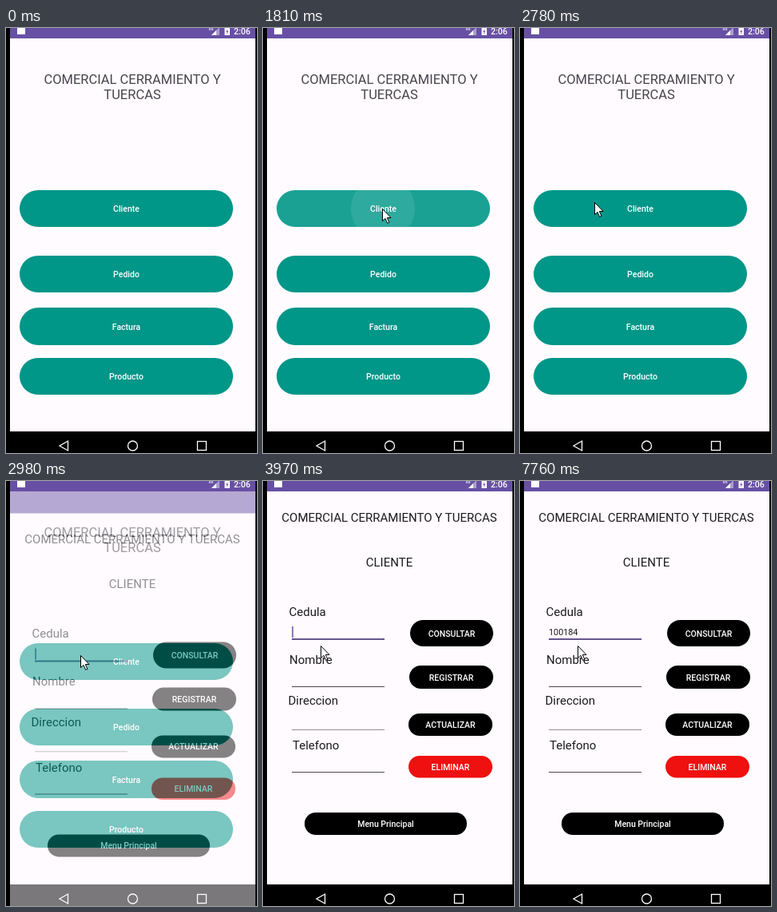
An HTML page for the animation above (8000 ms loop, 314 by 532 pixels).

```html
<!DOCTYPE html>
<html lang="es">
<head>
<meta charset="utf-8">
<style>
html, body { margin: 0; height: 100%; overflow: hidden; background: #000; }
svg { display: block; width: 314px; height: 532px; font-family: Roboto, sans-serif; }
.btn { font-size: 10.5px; font-weight: 500; fill: #fff; text-anchor: middle; }
.head { text-anchor: middle; }
</style>
</head>
<body>
<svg viewBox="0 0 314 532">
  <defs>
    <clipPath id="pill"><rect x="17" y="203" width="267" height="46" rx="23"/></clipPath>
    <clipPath id="screen"><rect x="5" width="307" height="532"/></clipPath>
  </defs>
  <g clip-path="url(#screen)">
    <g id="home">
      <rect x="5" width="307" height="505" fill="#fffbfe"/>
      <rect x="5" width="307" height="13" fill="#6750a4"/>
      <g class="head" font-size="16.5" fill="#49454f">
        <text x="158" y="70">COMERCIAL CERRAMIENTO Y</text>
        <text x="158" y="89.3">TUERCAS</text>
      </g>
    </g>
    <g id="form">
      <rect x="5" y="-60" width="307" height="565" fill="#fffbfe"/>
      <rect x="5" y="-60" width="307" height="73" fill="#6750a4"/>
      <rect x="5" y="505" width="307" height="60"/>
      <g font-size="15" fill="#1c1b1f">
        <g class="head">
          <text x="158" y="50.5">COMERCIAL CERRAMIENTO Y TUERCAS</text>
          <text x="158" y="106.5">CLIENTE</text>
        </g>
        <text x="32.5" y="169">Cedula</text>
        <text x="33" y="229">Nombre</text>
        <text x="31.5" y="279.7">Direccion</text>
        <text x="37" y="336.3">Telefono</text>
      </g>
      <path d="M36 198H152" stroke="#65558f" stroke-width="2"/>
      <path d="M36 257.5H152M36 364.5H152" stroke="#4d4951"/>
      <path d="M36 311.3H152" stroke="#8a868d"/>
      <text id="typed" x="36" y="193" font-size="10.8" fill="#1c1b1f"></text>
      <rect id="caret" y="182" width="1.5" height="14" fill="#6750a4"/>
    </g>
  </g>
  <g fill="none" stroke="#fff" stroke-width="1.3">
    <path d="M77.5 517V529L67 523Z"/>
    <circle cx="158.5" cy="523" r="6"/>
    <rect x="239.5" y="517.5" width="11" height="11"/>
  </g>
  <g fill="#fff">
    <rect x="14" y="-2" width="10" height="10"/>
    <path d="M257 9L267 -1V9Z" opacity=".45"/>
    <path d="M257 9L263 3V9Z"/>
    <path d="M254.5 0V3M256.5 0V3M258.5 0V3" stroke="#fff" stroke-width=".8"/>
    <rect x="273.5" y="-1" width="6.5" height="10"/>
    <path d="M277.4 1L275.3 5H276.6L276 8 278.3 4H277Z" fill="#6750a4"/>
    <text x="285" y="8" font-size="10.6" font-weight="500">2:06</text>
  </g>
  <path id="pointer" d="M.5 .5V15.6L4 12.4 6.6 18.4 8.9 17.4 6.3 11.5H11Z" fill="#fff" stroke="#000"/>
</svg>
<script>
const $ = id => document.getElementById(id);

function add(parent, tag, attrs, text = '') {
  const el = document.createElementNS('http://www.w3.org/2000/svg', tag);
  for (const k in attrs) el.setAttribute(k, attrs[k]);
  el.textContent = text;
  return parent.appendChild(el);
}

function button(parent, label, x, y, w, h, fill) {
  add(parent, 'rect', { x, y, width: w, height: h, rx: h / 2, fill });
  const overlay = add(parent, 'g', {});
  add(parent, 'text', { x: x + w / 2, y: y + h / 2 + 4, class: 'btn' }, label);
  return overlay;
}

const teal = '#009688';
const press = button($('home'), 'Cliente', 17, 203, 267, 46, teal);
button($('home'), 'Pedido', 17, 285, 267, 46, teal);
button($('home'), 'Factura', 17, 350, 267, 47, teal);
button($('home'), 'Producto', 17, 413, 267, 46, teal);

button($('form'), 'CONSULTAR', 184, 174, 104, 33, '#000');
button($('form'), 'REGISTRAR', 183, 231, 105, 29, '#000');
button($('form'), 'ACTUALIZAR', 182, 291, 105, 28, '#000');
button($('form'), 'ELIMINAR', 182, 344, 105, 27.5, '#ef1010');
button($('form'), 'Menu Principal', 52, 415, 203, 28, '#000');

press.setAttribute('clip-path', 'url(#pill)');
const glow = add(press, 'rect', { x: 17, y: 203, width: 267, height: 46, fill: '#fff' });
const ripple = add(press, 'circle', { cx: 150, cy: 226, fill: '#fff', opacity: .09 });

// Progress 0..1 from a to b, held on n evenly spaced moments
const stepped = (t, a, b, n) =>
  Math.min(1, Math.floor((t - a) / (b - a) * (n - 1) + 1e-6) / (n - 1));
// Latest of the given moments that has passed
const latest = (t, times) => times.filter(m => m <= t).pop();

function pointerAt(t) {
  if (t >= 3570) return [72, 206];
  if (t >= 3440) return [82, 211];
  if (t >= 2360) {
    const p = stepped(t, 2360, 2780, 7);
    return [155 - 62 * p * (2 - p), 226 - 8 * p];
  }
  if (t >= 1200) return [149, 226];
  if (t < 390) return [400, 600];
  const p = stepped(t, 390, 940, 8), e = p * (2 - p);
  return [302 - 128 * e, 516 - 290 * e];
}

const keys = [4370, 5030, 5690, 6160, 6620, 7300];
const blinks = [[3440, 3970], [4830, 5030], [5490, 5690], [7170, 7300], [7760, 8000]];

function draw(t) {
  $('pointer').setAttribute('transform', `translate(${pointerAt(t)})`);

  const pressed = t >= 1400 && t < 2160;
  press.setAttribute('visibility', pressed ? 'visible' : 'hidden');
  if (pressed) {
    const p = stepped(t, 1400, 2030, 9);
    glow.setAttribute('opacity', .1 * Math.min(1, .3 + p * 3));
    ripple.setAttribute('r', 12 + 45 * p);
  }

  const open = t >= 2980;
  $('form').setAttribute('visibility', open ? 'visible' : 'hidden');
  if (!open) return $('caret').setAttribute('visibility', 'hidden');

  const age = latest(t, [2980, 3050, 3110, 3180]) - 2950;
  const shift = age < 230 ? 43 * (1 - age / 350) ** 5 : 0;
  $('form').setAttribute('transform', `translate(0 ${shift})`);
  $('form').setAttribute('opacity', 1 - Math.max(0, 1 - age / 200) ** 4);

  const count = keys.filter(k => k <= t).length;
  $('typed').textContent = '100184'.slice(0, count);
  $('caret').setAttribute('x', 36.3 + count * 6.05);
  const off = blinks.some(([a, b]) => t >= a && t < b);
  $('caret').setAttribute('visibility', off ? 'hidden' : 'visible');
}

const start = performance.now();
function tick() {
  draw((performance.now() - start) % 8000);
  requestAnimationFrame(tick);
}
tick();
</script>
</body>
</html>
```
